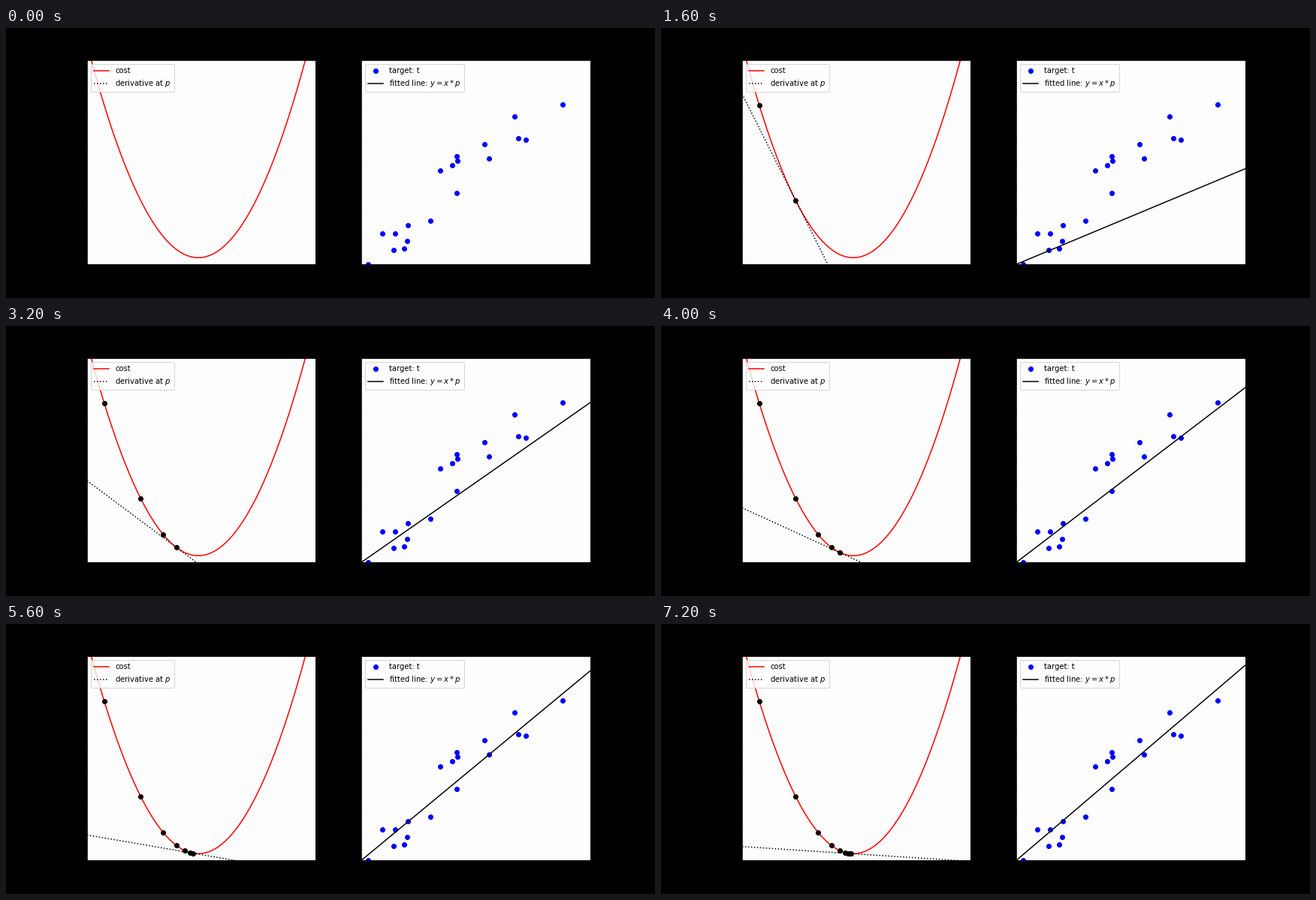
A matplotlib script that plays this animation: 864 by 360 pixels, repeating every 8 s.

```python
import numpy as np
import matplotlib.pyplot as plt
from matplotlib.animation import FuncAnimation

STEPS = 10
INTERVAL = 800
START, RATE = 0.3, 0.05   # first guess and learning rate

# Noisy samples of t = 2x
np.random.seed(1)
x = np.random.uniform(0, 1, 20)
t = 2 * x + 0.2 * np.random.randn(20)


def cost(p):
    return ((np.multiply.outer(p, x) - t) ** 2).sum(axis=-1)


def slope(p):
    return (2 * x * (x * p - t)).sum()


def descend(p, count):
    path = [p]
    while len(path) < count:
        path.append(path[-1] - RATE * slope(path[-1]))
    return np.array(path)


guesses = descend(START, STEPS - 1)

plt.rcParams["font.family"] = "DejaVu Sans"
fig, (left, right) = plt.subplots(1, 2, figsize=(12, 5), dpi=72, facecolor="black")
fig.subplots_adjust(left=0.125, right=0.9, bottom=0.125, top=0.88, wspace=0.2)

ps = np.linspace(0, 4, 100)
left.plot(ps, cost(ps), "r-", label="cost")
tangent, = left.plot([], [], "k:", label="derivative at $p$")
trail, = left.plot([], [], "ko")
right.plot(x, t, "bo", label="target: t")
fit, = right.plot([], [], "k-", label="fitted line: $y = x * p$")

for ax, xmax, ymax in ((left, 4, 14), (right, 1, 2)):
    ax.set(xlim=(0, xmax), ylim=(0, ymax), facecolor="#fdfdfd")
    ax.legend(loc="upper left")


def update(step):
    trail.set_data(guesses[:step], cost(guesses[:step]))
    if step == 0:
        tangent.set_data([], [])
        fit.set_data([], [])
    else:
        p = guesses[step - 1]
        ends = np.array([0, 4])
        tangent.set_data(ends, cost(p) + slope(p) * (ends - p))
        fit.set_data([0, 1], [0, p])
    return tangent, trail, fit


anim = FuncAnimation(fig, update, frames=STEPS, interval=INTERVAL,
                     init_func=lambda: update(0), repeat=True, repeat_delay=0)
plt.show()
```
